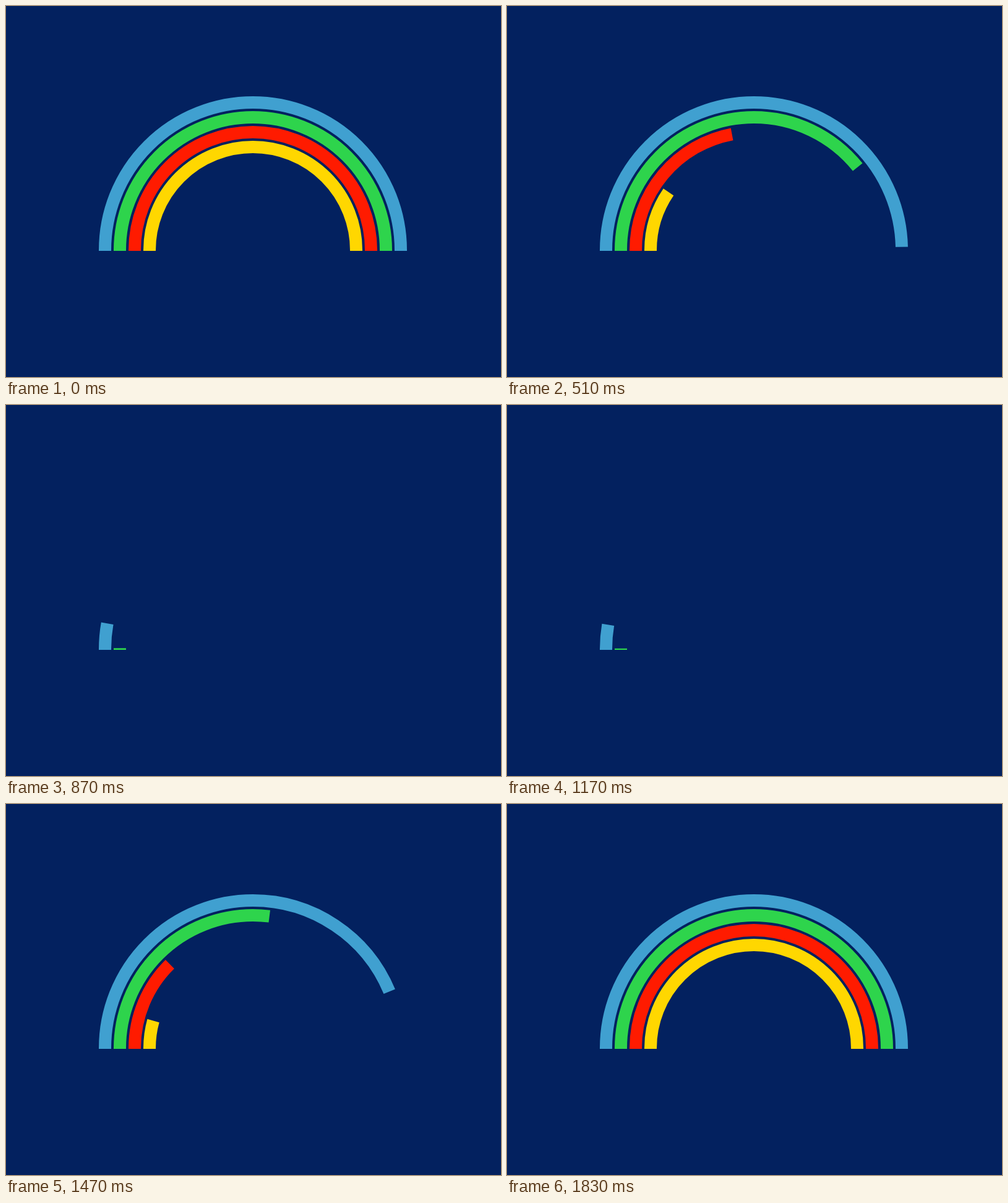
Write an HTML page with a canvas that moves like this. It is 800x600 px and loops after 2070 ms.

```html
<!DOCTYPE html>
<html lang="en">
<head>
<meta charset="utf-8">
<title>Rainbow</title>
<style>
  html, body { margin: 0; height: 100%; overflow: hidden; background: #03215f; }
  canvas { display: block; }
</style>
</head>
<body>
<canvas id="stage" width="800" height="600"></canvas>
<script>
const ctx = document.getElementById('stage').getContext('2d');

const STEP = 30;          // ms per drawn step
const STEPS = 69;         // steps per loop
const MIRROR = 68.1;      // growing replays shrinking backwards around half of this
const START = 7.2;        // step at which the first band starts to shrink
const DURATION = 17;      // steps one band takes
const STAGGER = 3;        // steps between bands
const CENTER = { x: 399, y: 395 };
const FOOT = 1;           // short straight piece at both ends of a band

// Innermost band first: it is the first to shrink and the last to grow.
const bands = [
  { radius: 167, color: '#ffd700' },
  { radius: 191, color: '#ff1b00' },
  { radius: 215, color: '#2ed44c' },
  { radius: 239, color: '#40a0d0' }
];

// Cubic Bezier easing with control points (x1, 0) and (x2, 1).
function ease(p, x1 = 0.294, x2 = 0.353) {
  if (p <= 0) return 0;
  if (p >= 1) return 1;
  let low = 0, high = 1;
  for (let i = 0; i < 30; i++) {
    const u = (low + high) / 2, v = 1 - u;
    const x = 3 * u * v * v * x1 + 3 * u * u * v * x2 + u ** 3;
    if (x < p) low = u; else high = u;
  }
  return low * low * (3 - 2 * low);
}

function drawBand({ radius, color }, amount) {
  if (amount <= 0) return;
  const { x, y } = CENTER;
  const length = Math.PI * radius + 2 * FOOT;
  ctx.strokeStyle = color;
  ctx.setLineDash(amount < 1 ? [length * amount, length * 2] : []);
  ctx.beginPath();
  ctx.moveTo(x - radius, y + FOOT);
  ctx.lineTo(x - radius, y);
  ctx.arc(x, y, radius, Math.PI, 2 * Math.PI);
  ctx.lineTo(x + radius, y + FOOT);
  ctx.stroke();
}

function draw(time) {
  const step = Math.floor((time + 0.5) / STEP) % STEPS;
  const phase = Math.min(step, MIRROR - step);
  ctx.fillStyle = '#03215f';
  ctx.fillRect(0, 0, 800, 600);
  ctx.lineWidth = 20;
  bands.forEach((band, i) => {
    drawBand(band, 1 - ease((phase - START - i * STAGGER) / DURATION));
  });
}

function tick() {
  draw(performance.now());
  requestAnimationFrame(tick);
}
tick();
</script>
</body>
</html>
```
